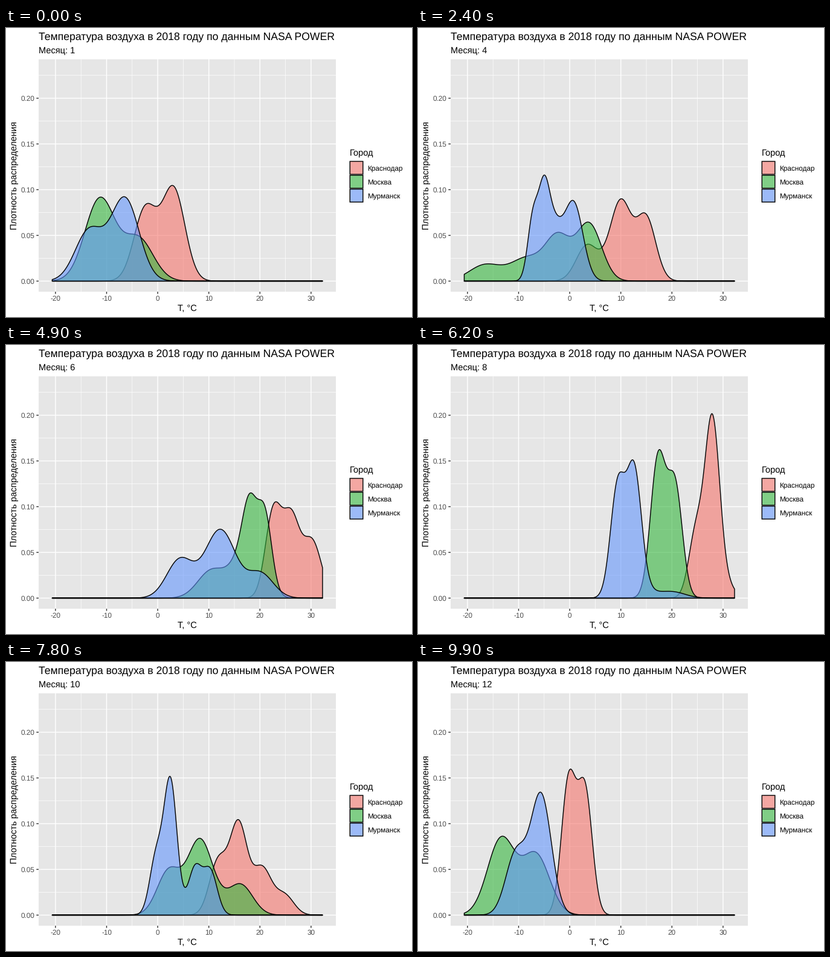
Recreate the animation shown at these times as a matplotlib script. Size 672x480 px, loop 10 s.

```python
import matplotlib.pyplot as plt
import numpy as np
from matplotlib.animation import FuncAnimation
from matplotlib.patches import Polygon, Rectangle

plt.rcParams.update({"font.family": "Liberation Sans", "text.hinting": "none"})

W, H, DPI = 672, 480, 96
FRAMES, STEP = 100, 9  # STEP frames per month
LEFT, RIGHT, TOP, BOTTOM = 54, 546, 52, 438
X0, PX_DEG = 251.1, 8.46
Y0, PX_DENS = 420.4, 1519
T_MIN, T_MAX = -20.64, 32.25

# Typical cold spell, warm spell and share of cold days in the key months
KEY_MONTHS = [1, 3, 5, 6, 7, 8, 9, 10, 12]
CITIES = {
    "Краснодар": ((246, 117, 109), [
        (-2.4, 3.1, .44), (3.4, 8.6, .62), (17.1, 21.2, .37),
        (22.6, 26.2, .64), (25.8, 30.2, .36), (24.7, 27.9, .26),
        (20.4, 24.8, .7), (11.8, 15.8, .37), (-.2, 3, .52)]),
    "Москва": ((53, 183, 62), [
        (-11.3, -3.8, .66), (-16.5, -8.4, .42), (11.9, 16, .44),
        (10.5, 17.3, .36), (18, 21, .43), (17.2, 20.5, .57),
        (10.2, 16.2, .4), (2.2, 7.9, .42), (-13.4, -6.6, .56)]),
    "Мурманск": ((100, 150, 253), [
        (-13.4, -6.4, .38), (-7.2, -5.1, .5), (.2, 6.7, .36),
        (4.4, 11, .5), (13.5, 20, .6), (9.4, 12.6, .48),
        (7.3, 10.3, .52), (-.3, 2.5, .3), (-10.5, -5.6, .34)]),
}

temps = np.linspace(T_MIN, T_MAX, 512)


def px(t):
    return X0 + PX_DEG * t


def py(d):
    return Y0 - PX_DENS * d


def pt(pixels):
    return pixels * 72 / DPI


def density(keys, month):
    """Two bells of equal width; the further apart, the wider."""
    cold, warm, share = (np.interp(month, KEY_MONTHS, col) for col in zip(*keys))
    width = .3 + .35 * (warm - cold)

    def bell(centre):
        z = (temps - centre) / width
        return np.exp(-z * z / 2) / (width * np.sqrt(2 * np.pi))

    return share * bell(cold) + (1 - share) * bell(warm)


def outline(curve):
    x = px(temps)
    return np.column_stack([np.r_[x, x[-1], x[0]], np.r_[py(curve), Y0, Y0]])


fig = plt.figure(figsize=(W / DPI, H / DPI), dpi=DPI, facecolor="white")
ax = fig.add_axes([0, 0, 1, 1])
ax.set_xlim(0, W)
ax.set_ylim(H, 0)
ax.axis("off")


def line(xs, ys, color, width, z):
    ax.plot(xs, ys, color=color, lw=pt(width), zorder=z,
            solid_capstyle="butt", snap=False)


def label(x, y, s, size, color="black", **kw):
    return ax.text(x, y, s, fontsize=size, color=color, va="baseline", **kw)


def box(x, y, w, h, color, **kw):
    ax.add_patch(Rectangle((x, y), w, h, facecolor=color, snap=False, **kw))


# Panel, grid and axes
box(LEFT, TOP, RIGHT - LEFT, BOTTOM - TOP, "#e6e6e6", lw=0, zorder=0)
for t in range(-20, 31, 5):
    major = t % 10 == 0
    line([px(t)] * 2, [TOP, BOTTOM], "white", 1.42 if major else .71, 1 + major)
    if major:
        line([px(t)] * 2, [BOTTOM, BOTTOM + 3.7], "#333333", 1.42, 3)
        label(px(t), 453.2, str(t), 8.8, "#4d4d4d", ha="center")
for k in range(10):
    d, major = k * .025, k % 2 == 0
    line([LEFT, RIGHT], [py(d)] * 2, "white", 1.42 if major else .71, 1 + major)
    if major:
        line([LEFT - 3.7, LEFT], [py(d)] * 2, "#333333", 1.42, 3)
        label(47.3, py(d) + 4.2, f"{d:.2f}", 8.8, "#4d4d4d", ha="right")

label(LEFT, 20, "Температура воздуха в 2018 году по данным NASA POWER", 13.26)
subtitle = label(LEFT, 42, "", 11)
label(300, 470, "T, °C", 11, ha="center")
ax.text(18, 245, "Плотность распределения", fontsize=11, rotation=90,
        rotation_mode="anchor", ha="center", va="baseline")

# Legend and density shapes
label(568.5, 212, "Город", 11)
shapes, curves = [], []
for k, (name, (rgb, keys)) in enumerate(CITIES.items()):
    fill = tuple(c / 255 for c in rgb) + (.6,)
    y = 220.7 + 23.04 * k
    box(568.5, y, 23.04, 23.04, "#f2f2f2", lw=0)
    box(569.3, y + .8, 21.5, 21.5, fill, edgecolor="black", lw=pt(1.42))
    label(598.5, y + 15.8, name, 8.8)
    curves.append([density(keys, m) for m in range(1, 13)])
    shape = Polygon(outline(curves[k][0]), closed=True, facecolor=fill,
                    edgecolor="black", lw=pt(1.42), joinstyle="round", zorder=5 + k)
    shapes.append(ax.add_patch(shape))


def update(i):
    month, step = divmod(i, STEP)
    after = min(month + 1, 11)
    f = step / STEP
    for shape, c in zip(shapes, curves):
        shape.set_xy(outline((1 - f) * c[month] + f * c[after]))
    subtitle.set_text(f"Месяц: {round(1 + i / STEP)}")
    return shapes + [subtitle]


anim = FuncAnimation(fig, update, frames=FRAMES, interval=100,
                     repeat=True, repeat_delay=0)
plt.show()
```
